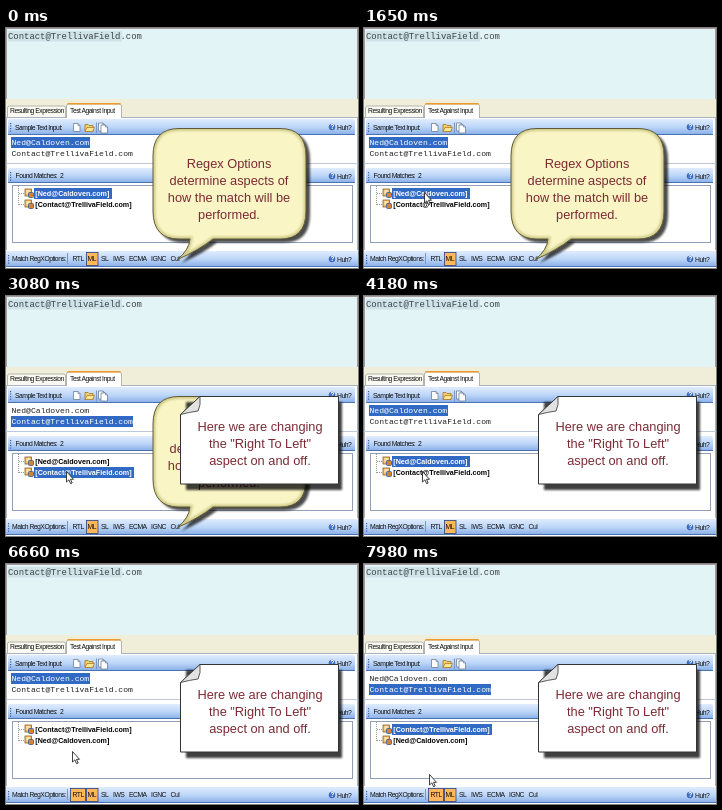
These frames come from a looping animation (352x240 px, 8000 ms). An HTML page:

```html
<!DOCTYPE html>
<html lang="en">
<head>
<meta charset="utf-8">
<title>Regex options</title>
<style>
html, body { margin: 0; width: 100%; height: 100%; overflow: hidden; background: #fff; }
svg { display: block; width: 352px; height: 240px; }
text { white-space: pre; }
.ui { font: 6.8px "Liberation Sans", Arial, sans-serif; letter-spacing: -.5px; fill: #111; }
.mono { font: 8.1px "Liberation Mono", monospace; fill: #222; }
.node { font: bold 7.15px "Liberation Sans", Arial, sans-serif; fill: #000; }
.note { font: 12.8px "Liberation Sans", Arial, sans-serif; fill: #7c2a34; text-anchor: middle; }
.on { fill: #fff; }
</style>
</head>
<body>
<svg viewBox="0 0 352 240">
  <defs>
    <linearGradient id="bar" x2="0" y2="1">
      <stop offset="0" stop-color="#e0ecfe"/>
      <stop offset=".5" stop-color="#bdd6f8"/>
      <stop offset="1" stop-color="#86ade6"/>
    </linearGradient>
    <filter id="soft" x="-10%" y="-10%" width="125%" height="125%">
      <feGaussianBlur stdDeviation="1.3"/>
    </filter>
    <path id="balloon" d="M173 100.500H274Q300 100.500 300 128V183Q300 211 274 211H207Q193 222 171.500 231.500Q183 222 184 211H173Q147 211 147 183V128Q147 100.500 173 100.500Z"/>
    <clipPath id="inside"><use href="#balloon"/></clipPath>
    <g id="page">
      <path d="M.5.5h4.500l2 2v6h-6.500z" fill="#fff" stroke="#6b7f9e" stroke-width=".8"/>
      <path d="M5 .5v2h2" fill="none" stroke="#6b7f9e" stroke-width=".7"/>
    </g>
    <g id="match">
      <rect x=".5" y=".5" width="6.500" height="7" fill="#f4c067" stroke="#87602a" stroke-width=".8"/>
      <path d="M2 2.500h3.500M2 4.300h2" stroke="#fff"/>
      <rect x="4" y="4" width="5" height="5" rx="1" fill="#cf8439" stroke="#47639a" stroke-width=".9"/>
    </g>
    <g id="help">
      <circle r="3" fill="#3f73cf" stroke="#23498f" stroke-width=".5"/>
      <text class="ui" x="-1.800" y="2.300" style="fill:#fff;font-weight:bold">?</text>
      <text class="ui" x="5" y="2.500">Huh?</text>
    </g>
  </defs>

  <rect width="352" height="240" fill="#fff"/>
  <rect width="352" height="71" fill="#e3f4f6"/>
  <rect x="2" y="3" width="114" height="10.500" fill="#d0e3e8"/>
  <text class="mono" x="2" y="11" style="font-size:8.930px;fill:#3a4448">Contact@TrellivaField.com</text>
  <path d="M0 .5h352M.5 0v71M351.500 0v71" stroke="#a89a9a"/>

  <rect y="71" width="352" height="19" fill="#f0eed9"/>
  <path d="M1.500 89v-9q0-2 2-2h54q2 0 2 2v9" fill="#fafaf2" stroke="#a3a69c" stroke-width=".8"/>
  <path d="M0 89.500h352M.5 90v132M351.500 90v132" stroke="#a9b3bd"/>
  <path d="M60.500 90v-12q0-2 2-2h51q2 0 2 2v12" fill="#fff" stroke="#a3a69c" stroke-width=".8"/>
  <path d="M61.500 75.800h53" stroke="#eb9a2e" stroke-width="1.600"/>
  <text class="ui" x="4" y="85.300">Resulting Expression</text>
  <text class="ui" x="64" y="84.700">Test Against Input</text>

  <g id="bars"></g>
  <text class="ui" x="9" y="102">Sample Text Input:</text>
  <use href="#page" x="67" y="95"/>
  <path d="M79 103.500v-7h3l1 1h4v6z" fill="#f7cf63" stroke="#a5762a" stroke-width=".8"/>
  <path d="M79 103.500l2-4h7.500l-2 4z" fill="#fde596" stroke="#a5762a" stroke-width=".7"/>
  <path d="M90.500 94.500v11" stroke="#7697cb"/>
  <use href="#page" x="92" y="94.500"/><use href="#page" x="94.500" y="96.500"/>
  <text class="ui" x="9.500" y="150.300">Found Matches:  2</text>
  <text class="ui" x="6" y="233">Match RegXOptions:</text>
  <path d="M61.500 225v11" stroke="#7697cb"/>

  <rect id="textSel" x="5" height="11" fill="#316ac5"/>
  <text class="mono" x="5.500" y="116.800" id="line0">Ned@Caldoven.com</text>
  <text class="mono" x="5.500" y="127.800" id="line1">Contact@TrellivaField.com</text>

  <rect x="6.500" y="157.500" width="340" height="57" fill="#fff" stroke="#8f9fb5"/>
  <path d="M12.500 158v19M13 165.500h6M13 176.500h6" fill="none" stroke="#999" stroke-dasharray="1 1"/>
  <use href="#match" x="18.500" y="160.500"/><use href="#match" x="18.500" y="171.500"/>
  <rect id="nodeSel" x="28" height="11" fill="#316ac5"/>
  <text class="node" x="29.300" y="168" id="node0"></text>
  <text class="node" x="29.300" y="179" id="node1"></text>

  <rect id="rtl" x="64.500" y="224.500" width="15" height="13" stroke="#28417f" stroke-width=".8"/>
  <rect x="80.500" y="224.500" width="11.500" height="13" fill="#ffb75a" stroke="#28417f" stroke-width=".8"/>
  <g id="opts"></g>

  <g id="bubble">
    <use href="#balloon" x="4" y="3.500" opacity=".7" filter="url(#soft)"/>
    <use href="#balloon" fill="#f9f5c5"/>
    <g clip-path="url(#inside)">
      <use href="#balloon" fill="none" stroke="#d3cd8c" stroke-width="5" filter="url(#soft)"/>
    </g>
    <use href="#balloon" fill="none" stroke="#5e5a38"/>
    <g id="bubbleText"></g>
  </g>
  <g id="paper">
    <path d="M180 106h156v88h-156z" opacity=".75" filter="url(#soft)"/>
    <path d="M194 100.500h138.500v87.500h-158v-69.500z" fill="#fff" stroke="#333"/>
    <path d="M194 100.500q1 9-2 14.500q-8 1-17.500 3.500z" fill="#e2e2e2" stroke="#333" stroke-width=".8"/>
    <g id="paperText"></g>
  </g>
  <path id="cursor" d="M.5.5v10.500l2.400-2.200 1.700 3.900 1.600-.7-1.700-3.700h3z" fill="#fff" stroke="#111" stroke-width=".8"/>
</svg>
<script>
const LOOP = 8000, STEP = 60;
const $ = id => document.getElementById(id);
const NS = "http://www.w3.org/2000/svg";

function add(parent, tag, attrs, text = "") {
  const el = document.createElementNS(NS, tag);
  for (const k in attrs) el.setAttribute(k, attrs[k]);
  el.textContent = text;
  $(parent).append(el);
}

// Toolbars: x, y, width, height
for (const [x, y, width, height] of [[2, 91, 347, 16], [2, 140, 347, 15], [0, 223, 352, 16]]) {
  add("bars", "rect", { x, y, width, height, rx: x, fill: "url(#bar)" });
  add("bars", "path", { d: `M${x} ${y + height - .5}h${width}`, stroke: "#4b72b2" });
  for (let i = 0; i < 4; i++)
    add("bars", "rect", { x: x + 2, y: y + 4 + i * 2.5, width: 1.2, height: 1.2, fill: "#3d62a6" });
  add("bars", "use", { href: "#help", x: 326, y: y + 8 });
}
add("bars", "path", { d: "M0 135.500h352", stroke: "#bcc9dc" });

const opts = { RTL: 66.5, ML: 81.5, SL: 95, IWS: 107, ECMA: 123, IGNC: 145, Cul: 164.5 };
for (const name in opts)
  add("opts", "text", { class: "ui", x: opts[name], y: 233 }, name);

function lines(parent, x, y, gap, rows) {
  rows.forEach((row, i) => add(parent, "text", { class: "note", x, y: y + i * gap }, row));
}
lines("bubbleText", 223, 140, 17, ["Regex Options", "determine aspects of", "how the match will be", "performed."]);
lines("paperText", 254, 135, 16.8, ["Here we are changing", 'the "Right To Left"', "aspect on and off."]);

// Cursor runs: start time, steps, end x, end y
const runs = [
  [260, 5, 74, 195], [700, 1, 73, 194], [1230, 8, 60, 164],
  [2510, 4, 60, 175], [3480, 3, 60, 163], [4180, 1, 58, 175],
  [4240, 10, 67, 227], [6300, 7, 66, 187], [6720, 6, 59, 162],
  [7740, 5, 65, 210]
];
const names = ["Ned@Caldoven.com", "Contact@TrellivaField.com"];

// Stepped progress that slows a little towards the end
function progress(t, start, n) {
  const p = Math.max(0, Math.min(1, (Math.floor((t - start) / STEP) + 1) / n));
  return 1 - (1 - p) ** 1.3;
}

// Last value whose time has passed
const pick = (t, table) => table.filter(row => row[0] <= t).pop()[1];

function cursorAt(t) {
  let x = 89, y = 209;
  for (const [start, n, ex, ey] of runs) {
    const p = progress(t, start, n);
    x += (ex - x) * p;
    y += (ey - y) * p;
  }
  return [Math.round(x), Math.round(y)];
}

function show(id, visible) {
  $(id).setAttribute("visibility", visible ? "visible" : "hidden");
}

function draw(t) {
  const line = pick(t, [[0, 0], [2890, 1], [3790, 0], [7140, 1]]);
  const node = pick(t, [[0, 0], [2830, 1], [3730, 0], [5640, -1], [7080, 0]]);
  const swap = t >= 5640 ? 1 : 0;

  $("textSel").setAttribute("y", 109 + line * 11);
  $("textSel").setAttribute("width", line ? 122 : 79);
  $("nodeSel").setAttribute("y", 160 + node * 11);
  $("nodeSel").setAttribute("width", node ^ swap ? 100 : 78);
  show("nodeSel", node >= 0);
  for (const i of [0, 1]) {
    $("line" + i).classList.toggle("on", i === line);
    $("node" + i).classList.toggle("on", i === node);
    $("node" + i).textContent = `[${names[i ^ swap]}]`;
  }

  $("rtl").setAttribute("fill", pick(t, [[0, "none"], [4720, "#ffdc9c"], [5580, "#f7a04a"], [6360, "#ffb75a"]]));
  show("rtl", t >= 4720);
  show("paper", t >= 2830);
  show("bubble", t < 3670);
  show("cursor", t >= 260);
  $("cursor").setAttribute("transform", `translate(${cursorAt(t)})`);
}

const begin = performance.now();
function tick() {
  draw((performance.now() - begin) % LOOP);
  requestAnimationFrame(tick);
}
tick();
</script>
</body>
</html>
```
